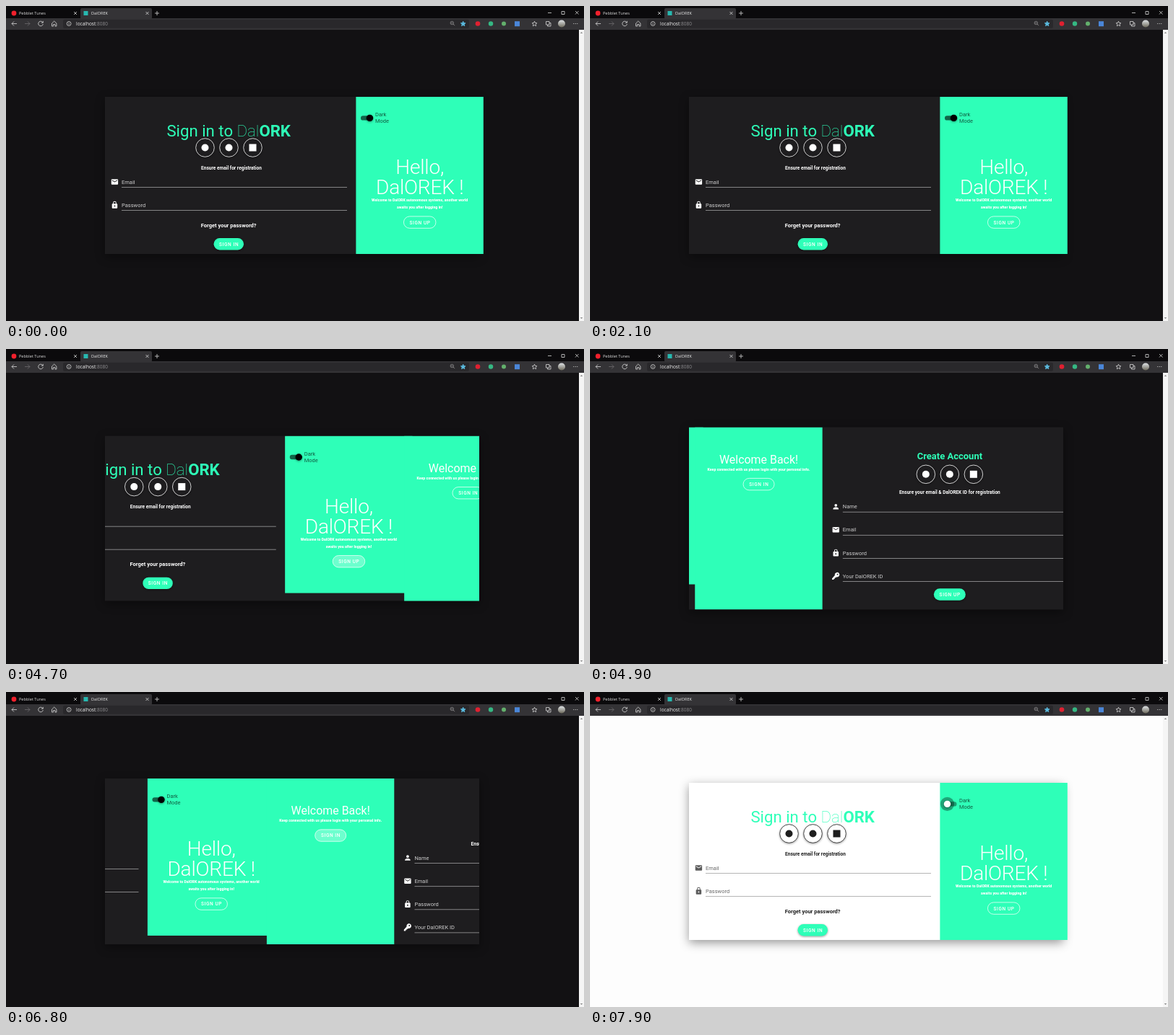
These frames come from a looping animation (800 px wide and 437 px high, 8 s). An HTML page:

```html
<!DOCTYPE html>
<html lang="en">
<head>
<meta charset="utf-8">
<title>Sign in</title>
<style>
html, body { margin: 0; height: 100%; overflow: hidden; background: #121113; }
svg {
  display: block; width: 100vw; height: 100vh;
  font-family: Roboto, Arial, sans-serif;
  --page: #121113; --card: #1e1d1f; --fg: #fff; --label: rgba(255,255,255,.78);
  --icon: #fff; --line: rgba(255,255,255,.65); --track: rgba(0,0,0,.6); --knob: #000;
}
svg.light {
  --page: #fdfdfd; --card: #fff; --fg: #1e1e1e; --label: rgba(0,0,0,.6);
  --icon: #5c5c5c; --line: rgba(0,0,0,.42); --track: rgba(0,0,0,.38); --knob: #fff;
}
text { white-space: pre; }
.bar text { font-family: "Open Sans", Arial, sans-serif; }
.bar .stroke { fill: none; stroke: #d8d8d8; stroke-width: .8; }
.raised { filter: drop-shadow(0 1px 1.5px rgba(0,0,0,.4)); }
#card { fill: var(--card); filter: drop-shadow(0 4px 7px rgba(0,0,0,.4)); }
</style>
</head>
<body>
<svg id="stage" viewBox="0 0 800 437" preserveAspectRatio="none"></svg>
<script>
const LOOP = 8000, GO = 4682, BACK = 6751, SWITCH = 7650;
const GREEN = '#2effb8', LEFT = 137, WIDTH = 518, MID = 235;
const SIDE = 176.4;   // green panels overhang the card at rest
const IN_H = 218, UP_H = 253;

const ICONS = {
  mail: 'M20 4H4a2 2 0 0 0-2 2v12a2 2 0 0 0 2 2h16a2 2 0 0 0 2-2V6a2 2 0 0 0-2-2zm0 4-8 5-8-5V6l8 5 8-5z',
  lock: 'M18 8h-1V6A5 5 0 0 0 7 6v2H6a2 2 0 0 0-2 2v10a2 2 0 0 0 2 2h12a2 2 0 0 0 2-2V10a2 2 0 0 0-2-2zM12 17a2 2 0 1 1 0-4 2 2 0 0 1 0 4zM9 8V6a3 3 0 0 1 6 0v2z',
  person: 'M12 12a4 4 0 1 0 0-8 4 4 0 0 0 0 8zm0 2c-2.7 0-8 1.3-8 4v2h16v-2c0-2.7-5.3-4-8-4z',
  key: 'M1 19v4h5v-3h3v-3h3l2-2A7 7 0 1 0 9 10zM17 5a2 2 0 1 1 0 4 2 2 0 0 1 0-4z'
};

const rect = (x, y, w, h, fill, extra = '') =>
  `<rect x="${x}" y="${y}" width="${w}" height="${h}" fill="${fill}" ${extra}/>`;
const circle = (x, y, r, fill, extra = '') =>
  `<circle cx="${x}" cy="${y}" r="${r}" fill="${fill}" ${extra}/>`;
const text = (x, y, size, weight, str, fill = '#fff', anchor = 'middle', extra = '') =>
  `<text x="${x}" y="${y}" font-size="${size}" font-weight="${weight}" fill="${fill}" text-anchor="${anchor}" ${extra}>${str}</text>`;
const stroke = (d, extra = '') => `<path class="stroke" d="${d}" ${extra}/>`;
const small = (x, y, str) => text(x, y, 5.2, 900, str);
const hello = (y, str) => text(572.7, y, 28.1, 300, str, '#fff', 'middle', 'letter-spacing="-.23"');

function pill(x, y, w, str, filled, id) {
  const box = (fill, extra) => rect(x - w / 2, y - 8.2, w, 16.4, fill, `rx="8.2" ${extra}`);
  return (filled ? box(GREEN, 'class="raised"') : box('none', 'stroke="#fff" stroke-width=".7"')) +
    (id ? box('#fff', `id="${id}" opacity="0"`) : '') +
    text(x + .3, y + 2.4, 6.56, 500, str, '#fff', 'middle', 'letter-spacing=".58"');
}

function field(x, y, icon, label) {
  return `<path d="${ICONS[icon]}" fill="var(--icon)" fill-rule="evenodd" transform="translate(${x - 15.2} ${y - 5.6}) scale(.469)"/>` +
    text(x, y + 2.7, 7.5, 400, label, 'var(--label)', 'start') +
    rect(x, y + 7.2, 312, .7, 'var(--line)');
}

function socials(x, y, id) {
  const ring = cx => circle(cx, y, 12.8, 'var(--card)', 'stroke="var(--fg)" stroke-width=".8" class="raised"');
  return ring(x - 33) + (id ? circle(x - 33, y, 12.8, '#fff', `id="${id}" opacity="0"`) : '') +
    ring(x) + ring(x + 33) + circle(x - 33, y, 5, 'var(--fg)') +
    circle(x, y, 5, 'var(--fg)') + rect(x + 28, y - 5, 10, 10, 'var(--fg)');
}

function browserBar() {
  const star = (x, extra) => stroke(`M${x} 21.2l1 2.2 2.4.3-1.8 1.6.5 2.4-2.1-1.2-2.1 1.2.5-2.4-1.8-1.6 2.4-.3z`, extra);
  return '<g class="bar">' +
    rect(0, 0, 800, 18, '#0b0a0c') + rect(103, 3, 99, 15, '#343336', 'rx="2"') + rect(0, 17, 800, 16, '#343336') +
    rect(79, 18.8, 562, 12, '#29282b', 'rx="2"') +
    circle(11, 10, 3.4, '#f0202c') + rect(107.5, 7, 6, 6, '#27b8b0') +
    text(18, 12, 5.6, 400, 'Pebblet Tunes', '#ddd', 'start') +
    text(118, 12, 5.6, 400, 'DalOREK', '#eee', 'start') +
    stroke('M94 8l4 4m0-4l-4 4M193.5 8l4 4m0-4l-4 4M206 10h6m-3-3v6') +
    stroke('M750 9.5h5M769 7.5h4v4h-4zM788 7l4.5 4.5m0-4.5l-4.5 4.5') +
    stroke('M15 24.5h-7m3-3l-3 3 3 3') +
    stroke('M26 24.5h7m-3-3l3 3-3 3', 'style="stroke:#6c6b6e"') +
    stroke('M51 23a3.3 3.3 0 1 0 .3 2M51.3 20.8v2.4h-2.4') +
    stroke('M63.5 24l3.2-3 3.2 3v4h-2v-2.5h-2.4v2.5h-2z') +
    stroke('M90 24.5a2.9 2.9 0 1 1-5.8 0 2.9 2.9 0 1 1 5.8 0M87.1 24v2M87.1 22.7v.6') +
    text(97, 27, 6.5, 400, 'localhost<tspan fill="#8d8c8f">:8080</tspan>', '#f2f2f2', 'start') +
    stroke('M619.5 23.5a2.2 2.2 0 1 1-4.4 0 2.2 2.2 0 1 1 4.4 0M619 25l2 2.2M616.3 23.5h2', 'opacity=".6"') +
    star(632.7, 'style="fill:#5bbbe0;stroke:#5bbbe0"') +
    circle(653, 24.5, 3.3, '#e02030') + circle(671, 24.5, 3.2, '#35b883') +
    circle(689, 24.5, 3, '#63b06c') + rect(704, 21.2, 7, 7, '#4a86d8') + star(731.5) +
    stroke('M747.5 21.5h4.5v4.5h-4.5zM749.5 26v2h4.5v-4.5h-2') +
    circle(769, 24.5, 5, 'url(#avatar)') +
    [785.8, 788.3, 790.8].map(x => circle(x, 24.5, .6, '#ddd')).join('') +
    '</g>' +
    rect(793, 33, 7, 404, '#f5f5f5') +
    '<path d="M794.8 38l1.700-2 1.700 2zM794.8 432l1.700 2 1.700-2z" fill="#888"/>';
}

// Pages are laid out from the top of the card.
const signIn =
  text(308.2, 54.5, 22.2, 400, 'Sign in to <tspan font-weight="100">Dal</tspan><tspan font-weight="700">ORK</tspan>', GREEN) +
  socials(308.5, 70.5, 'hoverSocial') +
  text(312, 100.6, 6.56, 700, 'Ensure email for registration', 'var(--fg)') +
  field(160, 118, 'mail', 'Email') + field(160, 150, 'lock', 'Password') +
  text(308.2, 180.6, 7.5, 700, 'Forget your password?', 'var(--fg)') +
  pill(308.3, 204.3, 41.5, 'SIGN IN', true) +
  rect(484.4, 0, SIDE, IN_H, GREEN) +
  rect(491, 26.2, 16.5, 6.4, 'var(--track)', 'rx="3.2"') +
  '<g id="toggle">' + circle(0, 29.4, 9.6, '#000', 'id="ripple" opacity=".35"') + circle(0, 29.4, 4.7, 'var(--knob)', 'class="raised"') + '</g>' +
  text(511, 27, 7.5, 400, 'Dark', 'rgba(0,0,0,.65)', 'start') +
  text(511, 36.3, 7.5, 400, 'Mode', 'rgba(0,0,0,.65)', 'start') +
  hello(107, 'Hello,') + hello(135.1, 'DalOREK !') +
  small(572.7, 145, 'Welcome to DalORK autonomous systems, another world') +
  small(572.7, 155, 'awaits you after logging in!') +
  pill(572.7, 174.1, 44.5, 'SIGN UP', false, 'hoverUp');

const signUp =
  rect(131.4, 0, SIDE, UP_H, GREEN) +
  text(219.7, 50, 15.94, 400, 'Welcome Back!') +
  small(219.7, 60.4, 'Keep connected with us please login with your personal info.') +
  pill(219.7, 79.1, 43, 'SIGN IN', false, 'hoverIn') +
  text(484, 44.6, 13, 700, 'Create Account', GREEN) +
  socials(484, 65.3) +
  text(484, 92.8, 6.56, 700, 'Ensure your email &amp; DalOREK ID for registration', 'var(--fg)') +
  [['person', 'Name'], ['mail', 'Email'], ['lock', 'Password'], ['key', 'Your DalOREK ID']]
    .map(([icon, label], i) => field(336, 110.1 + i * 32.1, icon, label)).join('') +
  pill(484, 232, 44, 'SIGN UP', true);

const stage = document.getElementById('stage');
stage.innerHTML = `<defs>
  <linearGradient id="avatar" x2="0" y2="1"><stop stop-color="#dfe3e6"/><stop offset="1" stop-color="#6d6a5c"/></linearGradient>
  <clipPath id="window"><rect id="clip" x="${LEFT}" width="${WIDTH}"/></clipPath></defs>` +
  rect(0, 0, 800, 437, 'var(--page)') +
  `<rect id="card" x="${LEFT}" width="${WIDTH}"/><g id="pages"><g id="in">${signIn}</g><g id="up">${signUp}</g></g>` +
  browserBar();

const $ = id => document.getElementById(id);
const set = (id, values) => { for (const k in values) $(id).setAttribute(k, values[k]); };
const clamp = x => Math.min(1, Math.max(0, x));
const ramp = (t, from, to) => clamp((t - from) / (to - from));
const pulse = (t, a, b, c, d) => ramp(t, a, b) - ramp(t, c, d);

// cubic-bezier(.25, .8, .5, 1)
function ease(x) {
  if (x <= 0) return 0;
  if (x >= 1) return 1;
  const curve = (s, a, b) => 3 * (1 - s) ** 2 * s * a + 3 * (1 - s) * s * s * b + s ** 3;
  let lo = 0, hi = 1;
  for (let i = 0; i < 24; i++) {
    const s = (lo + hi) / 2;
    if (curve(s, .25, .5) < x) lo = s; else hi = s;
  }
  return curve(lo, .8, 1);
}
const shift = (t, ms) => t < BACK ? ease((t - GO) / ms) : 1 - ease((t - BACK) / ms);

function draw(now) {
  const t = now % LOOP;
  const p = shift(t, 300), moving = p > 0 && p < 1;
  const height = IN_H + (UP_H - IN_H) * shift(t, 175), y = MID - height / 2;
  set('card', { y, height });
  set('clip', { y, height });
  set('pages', { 'clip-path': moving ? 'url(#window)' : 'none' });
  set('in', { transform: `translate(${-WIDTH * p} ${y})`, display: p < 1 ? 'inline' : 'none' });
  set('up', { transform: `translate(${WIDTH * (1 - p)} ${y})`, display: p > 0 ? 'inline' : 'none' });

  set('hoverSocial', { opacity: .45 * pulse(t, 3350, 3550, 3700, 3900) });
  set('hoverUp', { opacity: .3 * pulse(t, 4250, 4450, 4800, 5000) });
  set('hoverIn', { opacity: .3 * pulse(t, 6350, 6550, 7000, 7100) });

  set('toggle', { transform: `translate(${503.5 - 9 * ease((t - SWITCH) / 250)} 0)` });
  set('ripple', { r: 9.6 * ease((t - 7350) / 200) });
  stage.classList.toggle('light', t >= SWITCH);
  requestAnimationFrame(draw);
}
requestAnimationFrame(draw);
</script>
</body>
</html>
```
